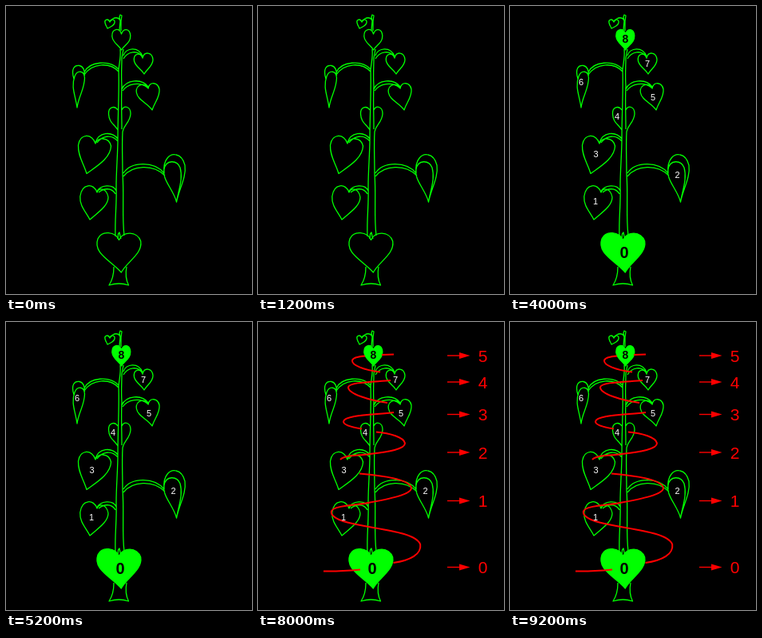
Write an HTML page with a canvas that moves like this. It is 308x360 px and loops after 10000 ms.

```html
<!DOCTYPE html>
<html lang="en">
<head>
<meta charset="utf-8">
<title>Spiral leaf arrangement</title>
<style>
html, body { margin: 0; width: 100%; height: 100%; overflow: hidden; background: #000; }
canvas { display: block; }
</style>
</head>
<body>
<canvas id="stage" width="308" height="360"></canvas>
<script>
const ctx = document.getElementById('stage').getContext('2d');
const GREEN = '#00ff00', RED = '#ff0000';
const FONT = '"Liberation Sans", Arial, sans-serif';
const STEP = 2000, LOOP = 10000;

const baseHeart = new Path2D('M141.500 292.500C137 282 120 280 115 291C108.500 309 131 318 144.300 333C152 319 171 310 168.700 294C164.500 281 146 281 141.500 292.500Z');
const topHeart = new Path2D('M144.500 35C142 27 132.500 27.500 132.800 38C134 47 141 48 144.500 55C149 48 156 46 155.800 37C155 27.500 147 27.500 144.500 35Z');

const plant = new Path2D([
  // foot and sprout
  'M135 326C135 335 133 343 129 349C137 346.500 146 346.500 153.500 349C150 342 149.500 334 151 326',
  'M140 291L140.500 285L142 283L143 288L144 291',
  // stem
  'M137 288C136 266 139 246 138 226C138 205 140 185 140 165C140 135 142 105 141 80C142 70 144 64 143 54',
  'M148 287C145 262 148 238 146 210C146 190 145 175 146 157M145 154C145 135 144 118 145 100C144 86 145 76 145 65L147 54',
  'M142 30L143 19L142 14L143 11L145 12L144 19L144 31',
  // branches
  'M114 232C118 223.500 134 222 138 231M116 233C122 228 132 226 137 235',
  'M112 171C116 157.500 132 156 140 166M114 171C120 162.500 132 159.500 140 169',
  'M145 104C150 92 170 90 178 101M146 106C152 97 168 94 177 102',
  'M147 62C150 52 166 50 171 63M147 66C152 57 165 54 171 64',
  'M98 83C104 69 130 67 141 79M98 86C108 71 130 70 141 82',
  'M147 209C157 193.500 186 194 198 209M147 213C158 199 184 197 199 212',
  'M131 19C135 13 141 14 143 18',
  // leaves
  'M114 233C110 221 95 221.500 92.800 238C92 250 100 257 105 267C115 258 128 250 128 239C126 228 117 226 114 233Z',
  'M198 209C196 191 206 184 213 186C218 187 222 191 224 199C226 214 217 228 213.500 245C210 230 195 217 198 204C200 192 214 192 218 202C222 216 216 230 213.500 245',
  'M112 172C108 159 93 158.500 90.500 174C90 188 97 196 101 209.500C114 200 131 190 131.500 175C129 164 115 163 112 172Z',
  'M140 130C136 124 128 126 128.500 135C129 146 136 148 140 155M145 130C148 124 156 125 156 135C155 146 148 148 146 157',
  'M178 103C174 94.500 162 98 163.300 108C165 118 177 121 183 130C186 120 193 114 192 104C190 95 180 94 178 103Z',
  'M85 91C81 78 86 73.500 92 74.500C97 75.500 98.500 82 98.500 87M89 127C87 112 81 101 86 88C89 80 98 80 98.500 90C98 105 91 112 89 127Z',
  'M171 65C168 56.500 159 60 160.500 69C163 77 169 78 173 85C177 78 184 75 184 67C183 57 173 56.500 171 65Z',
  'M130 20C128 15 123 17 124 21C125 25 126 25 127 28C131 26 137 24 136 19C135 16 131 16 130 20Z'
].join(''));

const spiral = new Path2D([
  'M82 311.500C98 312 112 311 128 309.500',
  'M169.500 301C191 298 205 290 203.200 278C197 261 140 258.500 112 250.500C94 246 87 238 95 233.500C104 228.500 121 229.500 138 226',
  'M138 226C162 221.500 192 216 192 207.500C190 196 154 192 127 189.500',
  'M103 172C109 166 125 167.500 140 165C164 162 184 159 184 151.500C183 144 165 139 148 137.500',
  'M130 133.500C114 131 107 128 107 124.500C108 116 146 116 170 113',
  'M162 101C140 98 113 90 113 81.500C114 75 143 75 166 73',
  'M153 62.500C133 60 117 54 118 48C119 44 127 43 134 42.500',
  'M155 41L170 40.500'
].join(''));

const leafLabels = [[1, 107, 248], [2, 209.5, 215], [3, 107.5, 189], [4, 134, 142], [5, 179, 118], [6, 89, 99], [7, 172, 76]];
const rowY = [306.5, 223.5, 163, 115.5, 75, 42];

function text(s, x, y, font, color) {
  ctx.font = font + ' ' + FONT;
  ctx.fillStyle = color;
  ctx.textAlign = 'center';
  ctx.fillText(s, x, y);
}

function arrow(y) {
  ctx.lineWidth = 1.4;
  ctx.strokeStyle = ctx.fillStyle = RED;
  ctx.beginPath();
  ctx.moveTo(237, y);
  ctx.lineTo(253, y);
  ctx.stroke();
  ctx.beginPath();
  ctx.moveTo(252, y - 4);
  ctx.lineTo(265.5, y);
  ctx.lineTo(252, y + 4);
  ctx.fill();
}

function draw(stage) {
  ctx.fillStyle = '#000';
  ctx.fillRect(0, 0, 308, 360);
  ctx.lineJoin = 'round';
  ctx.lineWidth = 1.3;
  ctx.strokeStyle = GREEN;
  ctx.stroke(plant);
  ctx.stroke(baseHeart);
  ctx.stroke(topHeart);

  if (stage >= 1) {
    ctx.fillStyle = GREEN;
    ctx.fill(baseHeart);
  }
  if (stage >= 2) ctx.fill(topHeart);
  if (stage >= 3) {
    ctx.strokeStyle = RED;
    ctx.lineWidth = 2;
    ctx.stroke(spiral);
  }
  if (stage >= 1) text('0', 143, 315, 'bold 20px', '#000');
  if (stage >= 2) {
    text('8', 144.5, 46, 'bold 14px', '#000');
    for (const [n, x, y] of leafLabels) text(n, x, y, '11px', '#fff');
  }
  if (stage >= 4) {
    rowY.forEach((y, n) => {
      arrow(y);
      text(n, 281.5, y + 7.5, '21px', RED);
    });
  }
}

function tick() {
  draw(Math.floor(performance.now() % LOOP / STEP));
  requestAnimationFrame(tick);
}
tick();
</script>
</body>
</html>
```
